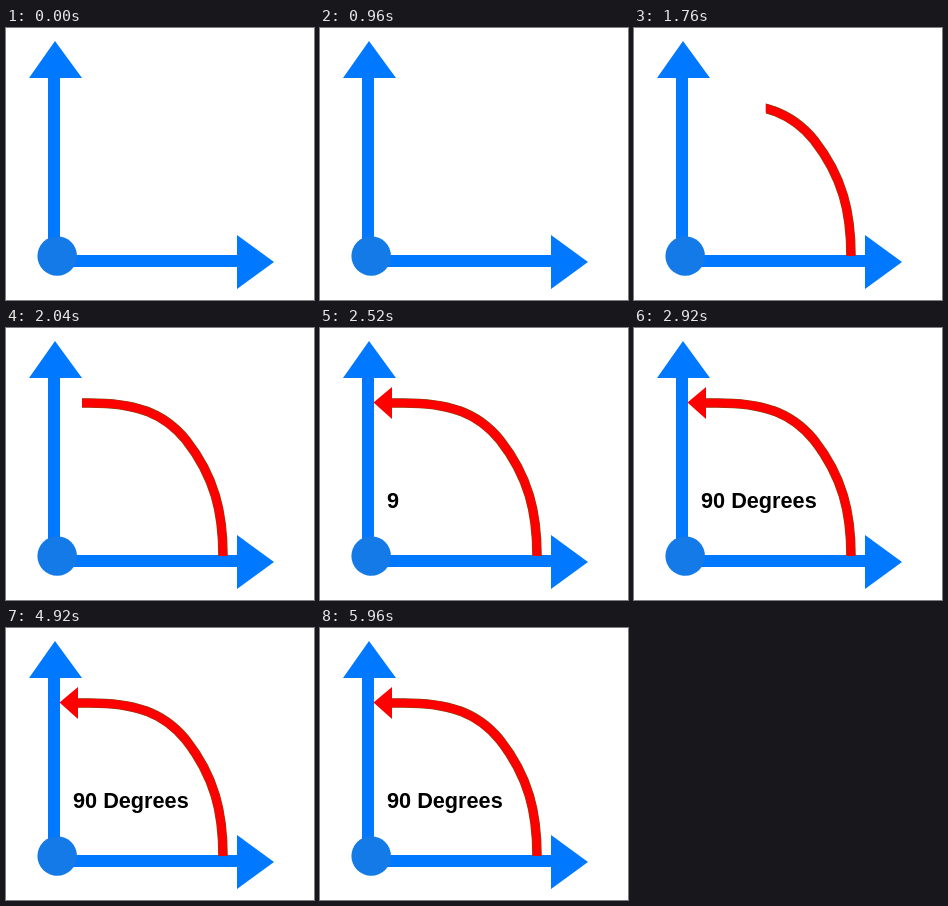
These frames come from a looping animation (308 by 272 pixels, 6040 ms). An HTML page:

```html
<!DOCTYPE html>
<html lang="en">
<head>
<meta charset="utf-8">
<title>90 degree angle</title>
<style>
  html, body { margin: 0; width: 100%; height: 100%; overflow: hidden; background: #fff; }
  svg { position: absolute; left: 0; top: 0; width: 308px; height: 272px; }

  .rise, .sweep, .label { animation: 6040ms linear infinite; }
  .rise  { animation-name: rise; }
  .sweep { animation-name: sweep; }
  .label { animation-name: label; }

  /* Lower arc: uncovered from the bottom, 1080 to 1720 ms */
  @keyframes rise {
    0%, 17.88%  { clip-path: inset(228px 0 0 140px); }
    25.166%     { clip-path: inset(108px 0 0 140px); }
    28.48%, to  { clip-path: inset(70px 0 0 140px); }
  }
  /* Upper arc and head: uncovered from the right, 1720 to 2360 ms */
  @keyframes sweep {
    0%, 28.48%  { clip-path: inset(0 168px 0 140px); }
    33.775%     { clip-path: inset(0 168px 0 76px); }
    39.07%, to  { clip-path: inset(0 168px 0 50px); }
  }
  /* Label: uncovered from the left, 2480 to 2900 ms */
  @keyframes label {
    0%, 41.06%  { clip-path: inset(0 241px 0 0); }
    48.01%, to  { clip-path: inset(0 120px 0 0); }
  }

  .axes { fill: #0078ff; }
  .edge, .arc { fill: none; }
  .edge { stroke: #7c4a16; stroke-width: 9.6; }
  .arc  { stroke: #f00; stroke-width: 8.4; }
  text  { font: bold 21.7px "Liberation Sans", Arial, sans-serif; }
</style>
</head>
<body>
<svg class="axes" viewBox="0 0 308 272">
  <path d="M42 228V50H23L49 13L76 50H54V228Z"/>
  <path d="M51 227H231V207L268 234L231 261V239H51Z"/>
  <circle cx="51.2" cy="228" r="19.8" fill="#147ae8"/>
</svg>

<svg class="rise" viewBox="0 0 308 272">
  <defs>
    <path id="curve" d="M217 228C217 185 209 149 180 112C157 84 128 74 77 75H70"/>
    <g id="arrow">
      <use href="#curve" class="edge"/>
      <use href="#curve" class="arc"/>
      <path d="M53.5 74.5L72 59V91Z" fill="#f00"/>
    </g>
  </defs>
  <use href="#arrow"/>
</svg>

<svg class="sweep" viewBox="0 0 308 272"><use href="#arrow"/></svg>

<svg class="label" viewBox="0 0 308 272"><text x="67" y="180">90 Degrees</text></svg>
</body>
</html>
```
